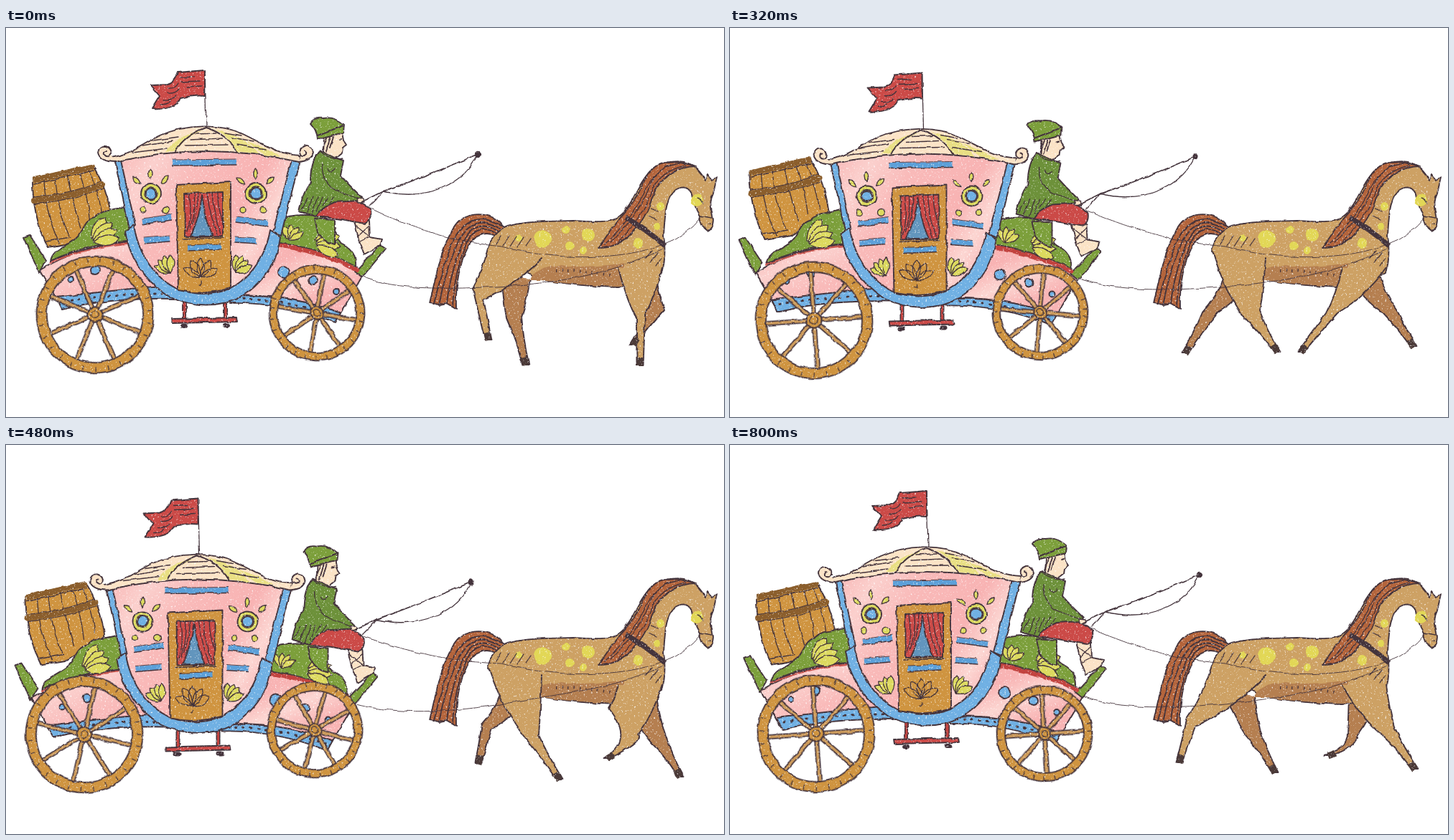
Recreate the animation shown at these times as an HTML page. Size 1000 by 543 pixels, loop 960 ms.

```html
<!DOCTYPE html>
<html lang="en">
<head>
<meta charset="utf-8">
<title>Horse and carriage</title>
<style>
html, body { margin: 0; height: 100%; overflow: hidden; background: #fff; }
svg { display: block; width: 100vw; height: 100vh; fill: none; stroke: #44343c; stroke-width: 1.9; stroke-linejoin: round; stroke-linecap: round; }
.pink { fill: url(#blush); }
.blue { fill: #70b0e3; }
.green { fill: #7c9f3b; }
.red { fill: #cb4a47; }
.wood { fill: #cf9440; }
.cream { fill: #fbe3c6; }
.leaf { fill: #dcd95e; }
.coat { fill: #cda164; }
.far { fill: #b57f50; }
.mane { fill: #b4643b; }
.fine { stroke-width: 1.3; }
.thin { stroke-width: .9; }
.plain { stroke: none; }
</style>
</head>
<body>
<svg viewBox="0 0 1000 543">
<defs>
  <linearGradient id="blush" x2="1" y2=".5">
    <stop stop-color="#f8b5b4"/><stop offset=".2" stop-color="#fbd0cd"/><stop offset=".4" stop-color="#f9bab9"/>
    <stop offset=".7" stop-color="#f8b3b3"/><stop offset=".85" stop-color="#fcd6d2"/><stop offset="1" stop-color="#f8b4b4"/>
  </linearGradient>
  <filter id="crayon" filterUnits="userSpaceOnUse" x="0" y="0" width="1000" height="543" color-interpolation-filters="sRGB">
    <feTurbulence type="fractalNoise" baseFrequency=".07" numOctaves="2" seed="4" result="wobble"/>
    <feDisplacementMap in="SourceGraphic" in2="wobble" scale="4" xChannelSelector="R" yChannelSelector="G" result="drawn"/>
    <feTurbulence type="fractalNoise" baseFrequency=".4" numOctaves="2" seed="9"/>
    <feColorMatrix values="0 0 0 0 1  0 0 0 0 1  0 0 0 0 1  4 0 0 0 -2.5"/>
    <feComposite in2="drawn" operator="atop"/>
  </filter>
  <path id="bars" d="M232,188L321,187M190,270L231,264M192,297L228,294M321,267L364,273M319,295L349,297M253,307L299,305"/>
  <g id="flower"><circle r="14" class="leaf"/><circle r="9" fill="#f3efd0" class="fine"/><circle r="7.5" class="blue"/></g>
</defs>
<g filter="url(#crayon)">
  <g id="barrel">
    <path class="wood" d="M37,210L120,191Q142,225 147,266L95,300L58,306Q36,260 37,210Z"/>
    <path class="fine" d="M53,207Q53,255 74,300M68,204Q72,255 88,290M84,200Q92,240 104,280M100,196Q113,230 118,270M112,194Q128,220 134,262M56,298L90,292"/>
    <path stroke="#8b5e2c" stroke-width="8" d="M39,241Q90,236 134,219M40,212L119,194"/>
    <path class="fine" d="M38,236Q90,232 132,214M39,246Q90,241 136,224M39,218L122,199"/>
  </g>

  <g id="chassis">
    <path class="pink" d="M47,338Q105,303 172,299L372,299Q440,308 497,345L466,398Q390,370 318,374L230,372Q150,365 74,385Z"/>
    <path class="blue" d="M70,376Q150,366 215,360L235,378Q150,376 78,392ZM312,375Q395,370 466,398L459,411Q385,382 312,384Z"/>
    <path stroke-width="3" stroke-dasharray="1.6 9" d="M80,382Q150,370 225,371M320,378Q390,378 460,403"/>
    <path stroke="#c9564f" stroke-width="3" d="M62,327Q110,306 172,300"/>
    <path class="green" d="M24,292L33,289L56,324L46,341ZM521,303L529,308L496,348L486,340Z"/>
    <path class="green" d="M62,325C65,308 85,305 98,293C108,285 108,268 124,264C135,252 150,256 167,250L177,285L170,298C130,300 90,312 62,325Z"/>
    <path class="green" d="M376,268C405,257 445,259 455,274C464,285 455,295 470,302C485,310 488,322 487,336C455,316 420,309 378,300Z"/>
    <path stroke="#c2433f" stroke-width="6" d="M378,303Q440,312 488,337"/>
    <path class="fine" d="M62,325Q110,306 170,298M376,299Q440,308 489,333"/>
    <g class="blue"><circle cx="124" cy="338" r="6"/><circle cx="90" cy="350" r="4"/><circle cx="387" cy="341" r="8"/><circle cx="428" cy="352" r="6"/><circle cx="460" cy="368" r="4"/></g>
    <g id="mounds" class="leaf fine"></g>
  </g>

  <g id="step">
    <path stroke-width="6" d="M249,380V405M305,380V405M246,416H250M305,415H309"/>
    <path stroke="#c2433f" stroke-width="3" d="M249,380V405M305,380V405"/>
    <path class="red" d="M231,406L321,404L322,410L232,412Z"/>
    <path class="red" d="M277,59L239,62Q234,77 224,79L201,80L214,95L203,113Q236,115 243,98Q260,93 277,95Z"/>
    <path class="fine" d="M277,59L279,138M243,69L262,68M244,75L270,74M252,82L272,81M226,84Q236,85 240,77M225,91Q236,92 241,85M220,100Q232,101 237,95M215,107Q225,107 229,102"/>
  </g>

  <g id="cabin">
    <path class="pink" d="M152,187Q278,155 408,185L378,290C365,350 320,372 275,376C220,370 185,335 174,280Z"/>
    <path class="blue" d="M152,187L160,185L180,276L172,281ZM398,184L409,185L383,289L372,284Z"/>
    <path class="cream" d="M146,181C175,176 190,162 215,150C250,134 300,133 330,148C365,165 380,177 411,178L408,187Q278,157 152,187Z"/>
    <path class="plain" fill="#e9df83" d="M274,143Q248,152 238,171L222,173Q240,148 274,143ZM292,142Q312,152 322,172L352,176Q330,148 292,142ZM335,158Q365,168 385,180L360,177Z"/>
    <path d="M278,139Q248,150 236,172M278,139Q308,148 322,173"/>
    <path class="fine" d="M190,165L232,158M205,157L240,152M175,174L225,168M257,156L302,154M264,148L293,147M249,164L310,163M305,146L328,150M314,153L345,158M322,163L362,170"/>
    <path class="cream" d="M154,187Q131,187 128,174Q130,164 139,165Q148,168 146,176Q142,182 137,177Q136,172 140,172M406,187Q426,186 428,174Q426,163 417,164Q408,167 410,175Q414,181 419,176Q420,172 416,171"/>
    <path class="blue" d="M166,284L178,275C185,320 210,350 238,364Q275,378 312,364C345,345 362,315 368,282L382,291C378,335 345,372 308,383Q265,393 226,374C190,350 172,320 166,284Z"/>
    <path class="wood" d="M237,219L313,215V363Q276,374 240,366Z"/>
    <path class="red" d="M249,231L302,229V291L250,292Z"/>
    <path fill="#6295bd" d="M273,233Q270,265 257,291L288,290Q277,265 273,233Z"/>
    <path class="fine" d="M255,231Q260,260 252,285M262,231Q264,255 256,281M268,231Q267,250 260,275M280,231Q284,260 294,289M287,230Q288,255 299,288M295,230Q294,245 302,272M247,295L304,293M268,358Q273,360 272,354"/>
    <use href="#bars" stroke="#5b9fd8" stroke-width="7" stroke-linecap="butt"/>
    <use href="#bars" y="4" class="fine"/>
    <use href="#bars" y="-4" class="thin"/>
    <use href="#flower" x="202" y="231"/><use href="#flower" x="348" y="231"/>
    <g class="leaf fine"><circle cx="191" cy="254" r="4"/><circle cx="222" cy="254" r="5"/><circle cx="330" cy="254" r="4"/><circle cx="358" cy="254" r="4"/><g id="petals"></g></g>
    <g id="palm" class="fine"></g>
  </g>

  <g id="rider">
    <path class="cream" d="M485,270L506,270L507,292L524,295L521,303L499,316L492,298Z"/>
    <path class="fine" d="M488,277L505,290M506,276L491,290M493,298L507,291"/>
    <path class="green" d="M430,266L458,268V302Q440,298 434,285Z"/>
    <path class="cream" d="M443,152L468,146L470,157L474,163L469,167L468,174L458,182L442,176Z"/>
    <path d="M447,153L441,170M452,152L446,172M456,152L451,168M464,156L467,155"/>
    <path class="green" d="M424,133Q428,124 442,126Q458,123 471,135L470,146L434,155Q433,142 424,133ZM434,150L470,136"/>
    <path class="red" d="M430,263Q442,240 470,236Q500,242 508,255Q510,268 500,273L488,271Q460,265 430,263Z"/>
    <path fill="#6d913a" d="M437,171Q424,185 424,215Q413,230 408,256L432,263Q440,250 458,243L492,241L495,236L478,219L466,206L470,185L456,180Z"/>
    <path class="fine" d="M437,172Q452,185 469,182M440,190Q440,220 465,229L490,238M448,196Q452,204 458,196M420,238L412,254M427,236L419,257M434,236L426,259M441,236L433,256M449,235L441,248M456,236L450,245"/>
    <path class="cream fine" d="M489,237L498,238L499,243L490,243Z"/>
    <path d="M495,243L525,228Q590,205 657,176"/>
    <path class="fine" d="M657,176C640,215 590,243 525,228Q516,240 506,249"/>
    <circle cx="657" cy="176" r="3.2" fill="#44343c"/>
  </g>

  <g id="wheels"></g>

  <path id="farHind" class="far"/><path id="farFore" class="far"/>
  <path class="mane" d="M697,288C688,256 650,255 632,268C612,285 600,340 590,384L603,386L613,384L627,392Q625,340 645,303Q660,280 682,290Z"/>
  <path d="M690,276Q650,252 625,292Q609,330 596,385M688,280Q653,258 631,295Q612,340 603,387M686,284Q655,264 637,297Q618,345 614,384M683,287Q657,270 641,300Q624,345 622,388"/>
  <path class="coat" d="M692,280C710,269 760,270 790,269C820,271 840,272 853,263C872,250 878,222 893,205C905,189 925,184 945,187C960,191 967,201 974,212L977,204L983,213L990,209L985,231Q980,241 982,250L985,268Q984,282 977,284Q967,277 966,262Q957,248 955,231Q948,218 935,225C918,235 918,260 916,290C919,310 917,332 913,342Q885,360 852,362Q795,360 750,352L700,330L671,312Q674,292 692,280Z"/>
  <path class="far plain" d="M728,352Q745,327 780,333Q825,334 862,328V361Q800,360 745,352Z"/>
  <path class="mane" d="M960,193Q905,175 888,214C880,238 865,254 850,270L825,307Q850,307 868,290Q890,268 898,243Q905,217 926,203Q942,193 960,193Z"/>
  <path class="fine" d="M938,189Q905,193 895,225Q880,262 842,299M925,191Q899,203 888,232Q872,265 833,303M946,192Q912,200 901,225Q886,265 852,300"/>
  <g id="nearLegs" class="coat"><path id="nearHind"/><path id="nearFore"/></g>
  <path id="hooves" stroke="#4b3a38" stroke-width="9" stroke-linecap="butt"/>
  <g class="plain" fill="#e2d756"><circle cx="747" cy="294" r="12"/><circle cx="714" cy="293" r="5"/><circle cx="780" cy="282" r="5"/><circle cx="785" cy="304" r="6"/><circle cx="811" cy="289" r="9"/><circle cx="804" cy="311" r="5"/><circle cx="880" cy="300" r="7"/><circle cx="911" cy="249" r="6"/><circle cx="906" cy="277" r="5"/><circle cx="962" cy="241" r="9"/></g>
  <path class="fine" d="M690,290L683,302M701,290L692,304M711,291L702,305M721,292L712,306M731,294L724,304M964,237Q970,240 971,246M966,262L983,265M977,274L981,273M898,252L908,256M896,262L906,267M900,311L890,322M907,314L897,327M912,321L904,333"/>
  <path stroke-width="4" stroke-dasharray="1.3 7" stroke-linecap="butt" d="M766,339Q800,338 842,345"/>
  <path stroke-width="7" stroke-linecap="butt" d="M862,264Q890,280 918,304"/>
  <path id="reins" class="thin"/>
</g>
</svg>
<script>
const $ = id => document.getElementById(id);
const STEP = 160, POSES = 6;

// Carriage motion per pose
const bounce = [0, -9.5, 3.5, 15.5, 19.5, 5];
const riderX = [0, -9.5, -9.5, -9.5, -9.5, -3];
const cabinX = [0, -11.5, -11.5, -11.5, -11.5, -5];
const barrelX = [0, -9.5, -9.5, -9.5, -9.5, 0];
const barrelY = [0, -10, -10, .5, 15, .5];

const wheels = [
  { r: 82, at: [[124, 400], [121, 403], [117, 408], [109, 404], [107, 405], [120, 403]], turn: [22, 1, -4, 13, 22, -4] },
  { r: 67, at: [[433, 398], [432, 401], [432, 397], [430, 398], [435, 408], [438, 403]], turn: [10, 0, 5, 15, 25, -4] },
];

// Each pose: back of knee, front of knee, hoof and, for folded legs, the shin's bend
const legs = {
  farHind: { back: [690, 345], front: [730, 350], poses: [
    [697, 405, 718, 403, 724, 470], [657, 400, 673, 412, 664, 473], [658, 397, 680, 397, 634, 454],
    [663, 390, 676, 398, 658, 444], [657, 381, 677, 384, 671, 447, 686, 415], [718, 405, 738, 397, 759, 457]] },
  farFore: { back: [862, 350], front: [905, 345], poses: [
    [892, 395, 917, 393, 873, 442], [917, 390, 926, 380, 924, 435], [910, 398, 929, 394, 952, 444],
    [898, 415, 917, 400, 940, 463], [890, 400, 902, 395, 907, 464], [860, 403, 874, 405, 832, 433, 866, 424]] },
  nearHind: { back: [671, 308], front: [746, 322], poses: [
    [650, 363, 665, 379, 672, 436], [682, 378, 706, 388, 724, 437], [712, 400, 738, 395, 762, 452],
    [720, 405, 742, 405, 771, 467], [705, 405, 728, 395, 730, 467], [637, 380, 648, 393, 626, 443]] },
  nearFore: { back: [853, 335], front: [914, 335], poses: [
    [878, 405, 890, 400, 883, 471], [832, 400, 846, 403, 823, 473], [830, 398, 846, 398, 795, 452],
    [840, 368, 880, 405, 836, 437, 882, 414], [866, 366, 902, 396, 859, 441, 902, 408], [908, 405, 925, 393, 954, 452]] },
};

const mix = (a, b, k) => a + (b - a) * k;

function drawLeg(id, pose) {
  const { back: [bx, by], front: [fx, fy], poses } = legs[id];
  const [kx, ky, lx, ly, hx, hy,
    sx = mix((kx + lx) / 2, hx, .45), sy = mix((ky + ly) / 2, hy, .45)] = poses[pose];
  $(id).setAttribute('d',
    `M${bx},${by}Q${mix(bx, kx, .4)},${mix(by, ky, .6)} ${kx},${ky}Q${sx - 5.5},${sy} ${hx - 4.5},${hy}L${hx + 4.5},${hy}` +
    `Q${sx + 5.5},${sy} ${lx},${ly}Q${mix(fx, lx, .4)},${mix(fy, ly, .6)} ${fx},${fy}`);
  const k = 11 / Math.hypot(hx - sx, hy - sy);
  return `M${mix(hx, sx, k)},${mix(hy, sy, k)}L${hx},${hy + 1}`;
}

// Leaves spread around a point; angles run clockwise from straight up
function fan(x, y, from, to, count, size, gap = 0) {
  const w = size * .2;
  return Array.from({ length: count }, (_, i) =>
    `<path transform="translate(${x} ${y}) rotate(${mix(from, to, i / (count - 1))})"
      d="M0,${-gap}q${-w * 2},${-size * .6} 0,${-size}q${w * 2},${size * .4} 0,${size}"/>`).join('');
}

function wheel({ r }) {
  const rim = r * .905, hub = r * .13;
  const spokes = Array.from({ length: 8 }, (_, i) => {
    const a = i * Math.PI / 4;
    return `M0,0L${Math.cos(a) * r * .81},${Math.sin(a) * r * .81}`;
  }).join('');
  return `<g><path d="${spokes}" stroke-width="7"/><path d="${spokes}" stroke="#cf9d5c" stroke-width="3.6"/>
    <circle r="${rim}" stroke-width="${r * .2}"/><circle r="${rim}" stroke="#cf9440" stroke-width="${r * .2 - 3.8}"/>
    <circle r="${rim + 2}" stroke-width="6" stroke-dasharray="1.3 ${r * .2}" stroke-linecap="butt"/>
    <circle r="${hub}" class="wood"/><circle r="${hub / 2}" class="fine"/></g>`;
}

$('mounds').innerHTML = fan(114, 300, 35, 82, 4, 36, 8) + fan(395, 296, -25, 60, 4, 22) + fan(424, 300, 60, 115, 4, 34, 8);
$('petals').innerHTML = fan(202, 231, -48, 45, 3, 14, 20) + fan(348, 231, -50, 48, 3, 14, 20)
  + fan(229, 342, -65, 0, 4, 25) + fan(320, 342, 0, 65, 4, 25);
$('palm').innerHTML = fan(271, 348, -62, 62, 5, 27);
$('wheels').innerHTML = wheels.map(wheel).join('');

function move(id, x, y) {
  $(id).setAttribute('transform', `translate(${x} ${y})`);
}

function draw(pose) {
  const dx = riderX[pose], dy = bounce[pose];
  move('rider', dx, dy);
  move('step', dx, dy);
  move('cabin', cabinX[pose], dy);
  move('chassis', cabinX[pose], dy);
  move('barrel', barrelX[pose], barrelY[pose]);
  wheels.forEach(({ at, turn }, i) =>
    $('wheels').children[i].setAttribute('transform', `translate(${at[pose]}) rotate(${turn[pose]})`));
  $('hooves').setAttribute('d', Object.keys(legs).map(id => drawLeg(id, pose)).join(''));
  $('reins').setAttribute('d',
    `M${508 + dx},${252 + dy}Q600,${297 + dy * .4} 690,305C760,325 860,325 915,302Q948,290 968,264` +
    `M${495 + dx},${346 + dy}C540,${367 + dy * .6} 620,${365 + dy * .6} 700,360S860,338 915,308`);
}

let shown = -1;
function tick() {
  const pose = Math.floor(performance.now() / STEP) % POSES;
  if (pose !== shown) draw(shown = pose);
  requestAnimationFrame(tick);
}
tick();
</script>
</body>
</html>
```
